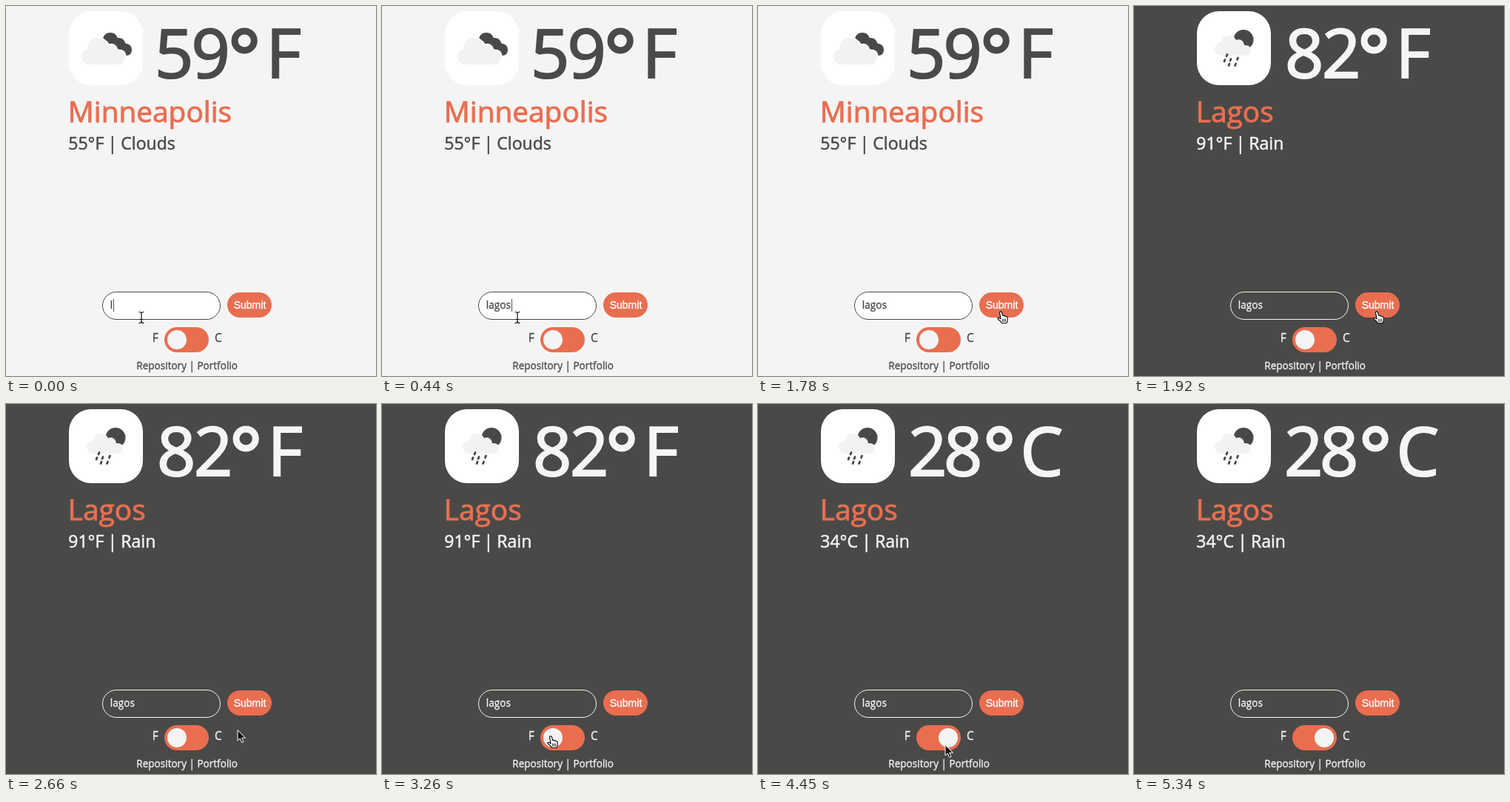
Animation of 500 by 500 pixels, one loop 6090 ms. Source, as an HTML page:

```html
<!DOCTYPE html>
<html lang="en">
<head>
<meta charset="utf-8">
<title>Weather</title>
<style>
html, body { margin: 0; width: 100%; height: 100%; overflow: hidden; }
svg { display: block; width: 100vw; height: 100vh; background: var(--bg); font-family: "Open Sans", "Noto Sans", sans-serif; }
svg { --bg: #f4f4f4; --ink: #4a4a4a; --field: #fff; --accent: #e96e50; }
svg.dark { --bg: #4a4947; --ink: #f5f5f5; --field: #4a4947; }
/* The thin stroke gives the letters a weight between regular and semibold */
text { fill: var(--ink); stroke: var(--ink); stroke-width: .024em; white-space: pre; }
.accent { fill: var(--accent); }
text.accent { stroke: var(--accent); }
.cloud { fill: #f2f2f2; }
.shade { fill: #484848; }
</style>
</head>
<body>
<svg id="stage" viewBox="0 0 500 500">
  <rect x="85" y="7" width="100" height="100" rx="30" fill="#fff"/>
  <g id="clouds">
    <path class="shade" d="M131 43.500Q133 36 141 36Q148.500 36 150.500 43Q159 42 161.500 50.500Q170 51.500 170 59.500Q169.500 67 162.500 67H150L139 55Z"/>
    <path class="cloud" stroke="#fff" stroke-width="3" paint-order="stroke" d="M112 79A11 11 0 0 1 110 57.500A14 14 0 0 1 134 47.500Q138 50 138 53Q148 50 150 60Q161 59 161 69Q161 79 151 79Z"/>
  </g>
  <g id="rain">
    <circle class="shade" cx="148" cy="45.500" r="13.500"/>
    <path class="cloud" d="M118 67A9 9 0 0 1 118 49A10.500 10.500 0 0 1 138 46Q147 43 149 53Q158 52 158 60Q158 67 150 67Z"/>
    <path stroke="#484848" stroke-width="2.800" stroke-linecap="round" d="M126 65.500l-1 2.500M123 72.500l-1 2.500M131 71.500l-1 2.500M129 78l-1 2.500M140.500 70l-1 2.500M137.500 78l-1 2.500"/>
  </g>
  <text id="temp" y="97" font-size="91.500"></text>
  <text id="city" class="accent" x="83.800" y="156.500" font-size="38.800"></text>
  <text id="detail" x="84.300" y="194" font-size="23" word-spacing="-.8"></text>
  <g id="spinner"></g>
  <rect x="130.500" y="386.500" width="159" height="37" rx="18.500" style="fill:var(--field);stroke:var(--ink)"/>
  <text id="query" x="140.800" y="409" font-size="13.600"></text>
  <rect id="caret" y="396" width="1" height="17" fill="#555"/>
  <rect class="accent" x="299" y="387" width="60" height="34" rx="17"/>
  <text x="329.500" y="409" font-size="14" text-anchor="middle" style="fill:#fff;stroke:#fff;font-family:'Liberation Sans',Arial,sans-serif">Submit</text>
  <text x="197.800" y="454" font-size="15.500">F</text>
  <rect class="accent" x="214" y="434" width="60" height="34" rx="17"/>
  <circle id="knob" cy="451" r="13" fill="#f4f4f4"/>
  <text x="282" y="454" font-size="15.500">C</text>
  <text x="176.300" y="491" font-size="13.550">Repository | Portfolio</text>
  <g id="cursor" stroke-linejoin="round" stroke-linecap="round">
    <g id="beam" fill="none">
      <path stroke="#fff" stroke-width="2.400" d="M0-5V5"/>
      <path stroke="#111" stroke-width="1.200" d="M-3-7.500Q0-7.500 0-5V5Q0 7.500-3 7.500M3-7.500Q0-7.500 0-5M0 5Q0 7.500 3 7.500M-2 2.500H2"/>
    </g>
    <path id="arrow" fill="#111" stroke="#fff" d="M1 1V15L4.200 12L6.500 17.500L9 16.500L6.700 11.200H11Z"/>
    <g id="hand" fill="#fff" stroke="#111" stroke-width="1.200">
      <path d="M5 10L3.600 3Q3.200 1 4.800 .8Q6.200 .7 6.600 2.400L7.600 6.300Q9.300 5.600 9.900 7Q11.600 6.300 12.200 7.800Q14 7.500 14.300 9.300Q14.800 13 13 16.500H6.500Q5.500 14.500 2.600 12.300Q.2 10.300 1.200 9.400Q2.300 8.400 5 10.800Z"/>
      <path fill="none" stroke-width=".9" d="M7.500 11V14.500M9.500 11V14.500M11.500 11V14.500"/>
    </g>
  </g>
</svg>
<script>
const $ = id => document.getElementById(id);
const LOOP = 6090;

// Each row: start time, then the values held from there on
const typing = [[0, 'l'], [150, 'la'], [290, 'lag'], [440, 'lagos']];
const pointer = [
  [0, 'beam', 183, 421], [890, 'beam', 205, 411], [1040, 'beam', 266, 391],
  [1180, 'hand', 315, 418], [1330, 'hand', 321, 414], [1480, 'hand', 323, 412],
  [2220, 'hand', 322.5, 412], [2520, 'arrow', 312, 440], [2670, 'arrow', 268, 469],
  [2820, 'arrow', 218, 469], [2960, 'arrow', 200, 458], [3110, 'hand', 217, 449],
  [3260, 'hand', 223, 448], [3710, 'hand', 223, 447], [4450, 'arrow', 252, 460],
  [4600, 'arrow', 273, 469], [5050, 'arrow', 318, 476], [5200, 'arrow', 400, 487],
  [5340, 'none', 0, 0]
];
const knob = [[0, 231], [4000, 233], [4150, 246], [4300, 255], [4450, 257]];

// Digits, their places, degree place, unit, unit place, city, detail line
const weather = [
  [0, '59', '201 250.5', 299.5, 'F', 351.5, 'Minneapolis', '55°F | Clouds'],
  [1920, '82', '204 254', 301.5, 'F', 353.5, 'Lagos', '91°F | Rain'],
  [4300, '28', '203 251', 303.5, 'C', 354.5, 'Lagos', '34°C | Rain']
];

const at = (rows, t) => rows.findLast(row => row[0] <= t);
const show = (id, on) => { $(id).style.display = on ? '' : 'none'; };

// Spokes brighten counterclockwise, from five o'clock round to six
$('spinner').innerHTML = Array.from({ length: 12 }, (_, i) => {
  const g = 45 + 17 * i;
  return `<path d="M0-24V-43" transform="rotate(${150 - 30 * i})" stroke="rgb(${g},${g},${g})" stroke-width="8" stroke-linecap="round"/>`;
}).join('');

let current;
function setWeather(row) {
  if (row === current) return;
  current = row;
  const [start, digits, xs, degX, unit, unitX, city, detail] = row;
  const dark = start > 0;
  $('stage').classList.toggle('dark', dark);
  show('clouds', !dark);
  show('rain', dark);
  $('temp').innerHTML = `<tspan x="${xs}">${digits}</tspan><tspan x="${degX}" y="107.5" font-size="106" stroke-width="3">°</tspan><tspan x="${unitX}" y="97">${unit}</tspan>`;
  $('city').textContent = city;
  $('detail').textContent = detail;
}

function draw(t) {
  setWeather(at(weather, t));

  $('query').textContent = at(typing, t)[1];
  show('caret', t < 890);
  $('caret').setAttribute('x', Math.round(141.5 + $('query').getComputedTextLength()));

  const [, kind, x, y] = at(pointer, t);
  for (const id of ['beam', 'arrow', 'hand']) show(id, id === kind);
  $('cursor').setAttribute('transform', `translate(${x} ${y})`);

  $('knob').setAttribute('cx', at(knob, t)[1]);

  show('spinner', t >= 4000 && t < 4300);
  const turn = t < 4150 ? 0 : -60;
  $('spinner').setAttribute('transform', `translate(245 266) rotate(${turn})`);
}

function tick() {
  draw(performance.now() % LOOP);
  requestAnimationFrame(tick);
}
tick();
</script>
</body>
</html>
```
